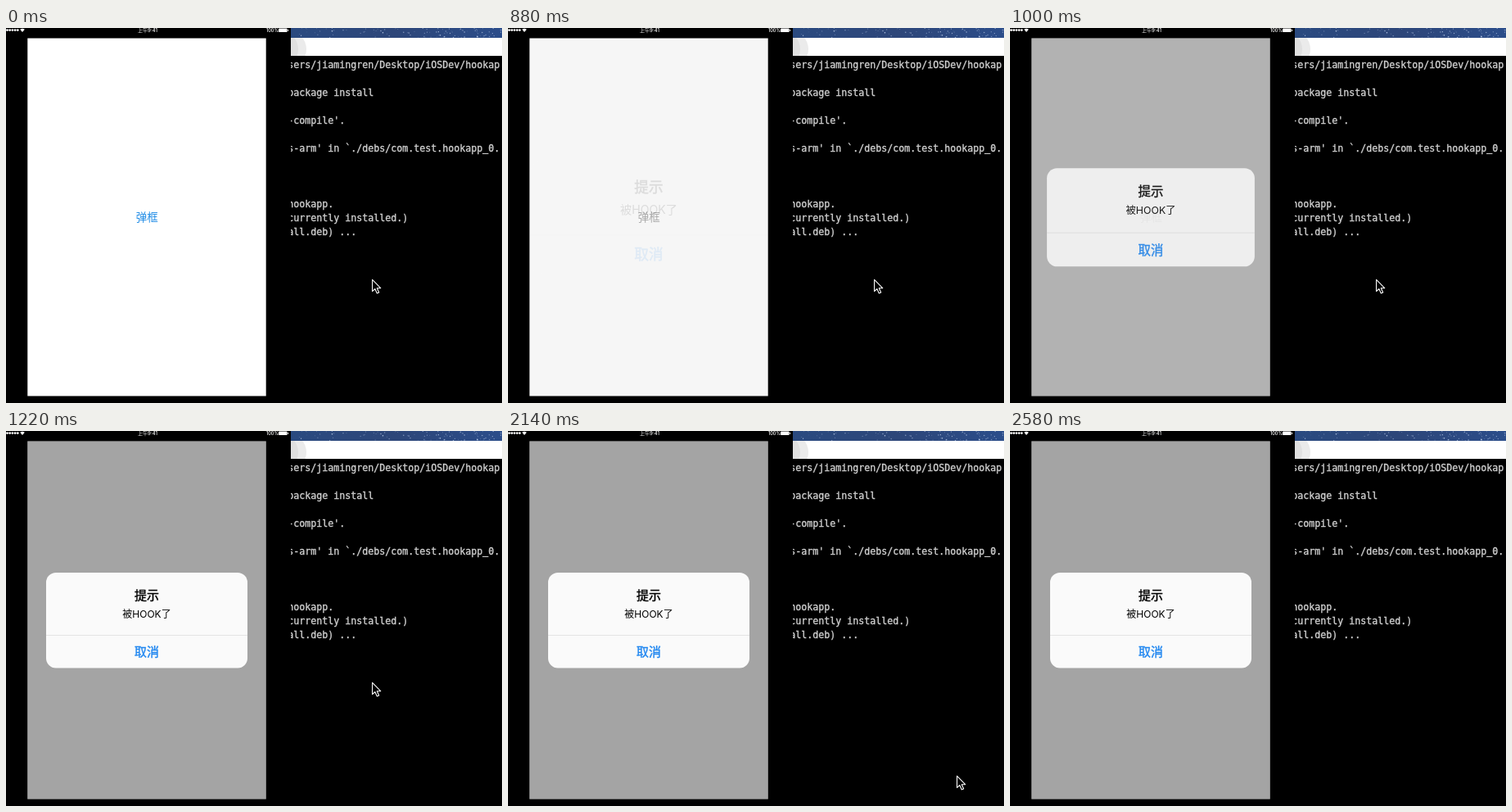
Recreate the animation shown at these times as an HTML page. Size 606 by 458 pixels, loop 2930 ms.

```html
<!DOCTYPE html>
<html lang="zh">
<head>
<meta charset="utf-8">
<title>Alert hook demo</title>
<style>
  html, body { margin: 0; width: 100%; height: 100%; overflow: hidden; background: #000; }
  svg { display: block; width: 100vw; height: 100vh; }
  text { font-family: Inter, "Noto Sans CJK SC", "Noto Sans CJK", sans-serif; }
  .mid { text-anchor: middle; }
  .term text {
    font: 11.63px "DejaVu Sans Mono", monospace; white-space: pre;
    fill: #d0d0d0; stroke: #d0d0d0; stroke-width: .35;
  }
  .status { fill: #fff; }
  .status text { font-weight: 500; }
  .strong { font-size: 15px; stroke-width: .4; }
</style>
</head>
<body>
<svg viewBox="0 0 606 458" xmlns="http://www.w3.org/2000/svg">
  <defs>
    <clipPath id="right"><rect x="348" y="0" width="258" height="458"/></clipPath>
    <linearGradient id="sky">
      <stop offset="0" stop-color="#2a4a80"/>
      <stop offset=".5" stop-color="#2d4679"/>
      <stop offset="1" stop-color="#2b4d8a"/>
    </linearGradient>
  </defs>
  <rect width="606" height="458"/>

  <g clip-path="url(#right)">
    <rect x="347" width="259" height="12" fill="url(#sky)"/>
    <g id="stars"></g>
    <svg x="347" y="12" width="259" height="22">
      <rect width="259" height="22" fill="#fff"/>
      <circle cx="-3" cy="14" r="23" fill="#ebebeb"/>
      <circle cx="-13" cy="14" r="23" fill="#e0e0e0"/>
    </svg>
    <g id="term" class="term"></g>
  </g>

  <g class="status">
    <g id="signal"></g>
    <path d="M17.2 1.8Q20 -.4 22.8 1.8L20 5z"/>
    <text class="mid" x="173" y="5" font-size="6">上午9:41</text>
    <text x="318" y="5" font-size="5.5">100%</text>
    <rect x="333" y=".6" width="10.6" height="4.4" rx=".8"/>
    <rect x="344.2" y="1.8" width="1" height="2"/>
  </g>

  <rect x="26.3" y="12.5" width="291.4" height="437" fill="#fff"/>
  <text id="button" class="mid" x="172.2" y="236.1" font-size="13.5">弹框</text>
  <rect id="dim" x="26.3" y="12.5" width="291.4" height="437"/>

  <g id="alert">
    <rect x="49" y="173" width="246" height="116.4" rx="12" fill="#fafafa"/>
    <path d="M49 249.5H295" stroke="#dfdfdf" stroke-width=".8"/>
    <text class="mid strong" x="172" y="205.7" stroke="#000">提示</text>
    <text class="mid" x="172" y="227.5" font-size="12">被HOOK了</text>
    <text class="mid strong" x="172" y="275.2" fill="#1f86f0" stroke="#1f86f0">取消</text>
  </g>

  <path id="cursor" d="M.6 .4V14.6L3.8 11.6 6.3 17 8.7 16 6.3 10.7H10.7Z"
        fill="#000" stroke="#fff" stroke-width="1.1" stroke-linejoin="round"/>
</svg>
<script>
const LOOP = 2930;
const $ = id => document.getElementById(id);

function add(parent, tag, attrs, text) {
  const el = document.createElementNS("http://www.w3.org/2000/svg", tag);
  for (const key in attrs) el.setAttribute(key, attrs[key]);
  if (text) el.textContent = text;
  parent.append(el);
}

const lines = [
  [49, "sers/jiamingren/Desktop/iOSDev/hookap"],
  [83, "package install"],
  [117, "-compile'."],
  [151, "s-arm' in `./debs/com.test.hookapp_0."],
  [219, "hookapp."],
  [236, "currently installed.)"],
  [253, "all.deb) ..."]
];
for (const [y, text] of lines) add($("term"), "text", { x: 344.2, y }, text);

for (let i = 0; i < 5; i++) add($("signal"), "circle", { cx: 1.5 + 3.2 * i, cy: 2.6, r: 1.4 });

let seed = 7;
const random = () => (seed = seed * 16807 % 2147483647) / 2147483647;
for (let i = 0; i < 110; i++) {
  add($("stars"), "circle", {
    cx: 347 + random() * 259, cy: random() * 12,
    r: 0.3 + random() * 0.5, fill: "#c3d3ee", opacity: 0.3 + random() * 0.6
  });
}

// Cursor keyframes: time, x, y
const path = [[1800, 530, 387], [2140, 551, 427], [2320, 581, 434], [2580, 584, 458]];

function cursorAt(t) {
  if (t < 1800) return [447, 307];
  if (t >= 2580) return null;
  t = t < 2320 ? hold(t, 1800, 520 / 9) : t < 2380 ? 2320 : hold(t, 2380, 50);
  const i = path.findIndex((p, k) => k && t <= p[0]);
  const [t0, x0, y0] = path[i - 1], [t1, x1, y1] = path[i];
  const k = (t - t0) / (t1 - t0);
  return [Math.round(x0 + (x1 - x0) * k), Math.round(y0 + (y1 - y0) * k)];
}

function hold(t, start, step) {
  return start + Math.floor((t - start) / step + 1e-6) * step;
}

// Alert presentation, 0 to 1
function shown(t) {
  if (t < 880) return 0;
  if (t >= 1220) return 1;
  return 1 - 0.9 * 0.42 ** ((hold(t, 880, 60) - 880) / 60);
}

function buttonLook(t) {
  if (t < 590) return ["#1e8be6", 1];
  if (t < 770) return ["#1e8be6", 0.2];
  if (t < 820) return ["#1e8be6", 0.45];
  if (t < 880) return ["#6f8fa8", 0.65];
  return ["#808080", 0.7];
}

function draw(t) {
  const p = shown(t), scale = 1.2 - 0.2 * p;
  const [fill, opacity] = buttonLook(t);
  $("button").setAttribute("fill", fill);
  $("button").setAttribute("opacity", opacity);
  $("dim").setAttribute("opacity", 0.357 * p);
  $("alert").setAttribute("opacity", p);
  $("alert").setAttribute("transform", `translate(172 231) scale(${scale}) translate(-172 -231)`);
  const pos = cursorAt(t);
  $("cursor").setAttribute("visibility", pos ? "visible" : "hidden");
  if (pos) $("cursor").setAttribute("transform", `translate(${pos})`);
}

const start = performance.now();
function tick() {
  draw((performance.now() - start) % LOOP);
  requestAnimationFrame(tick);
}
tick();
</script>
</body>
</html>
```
